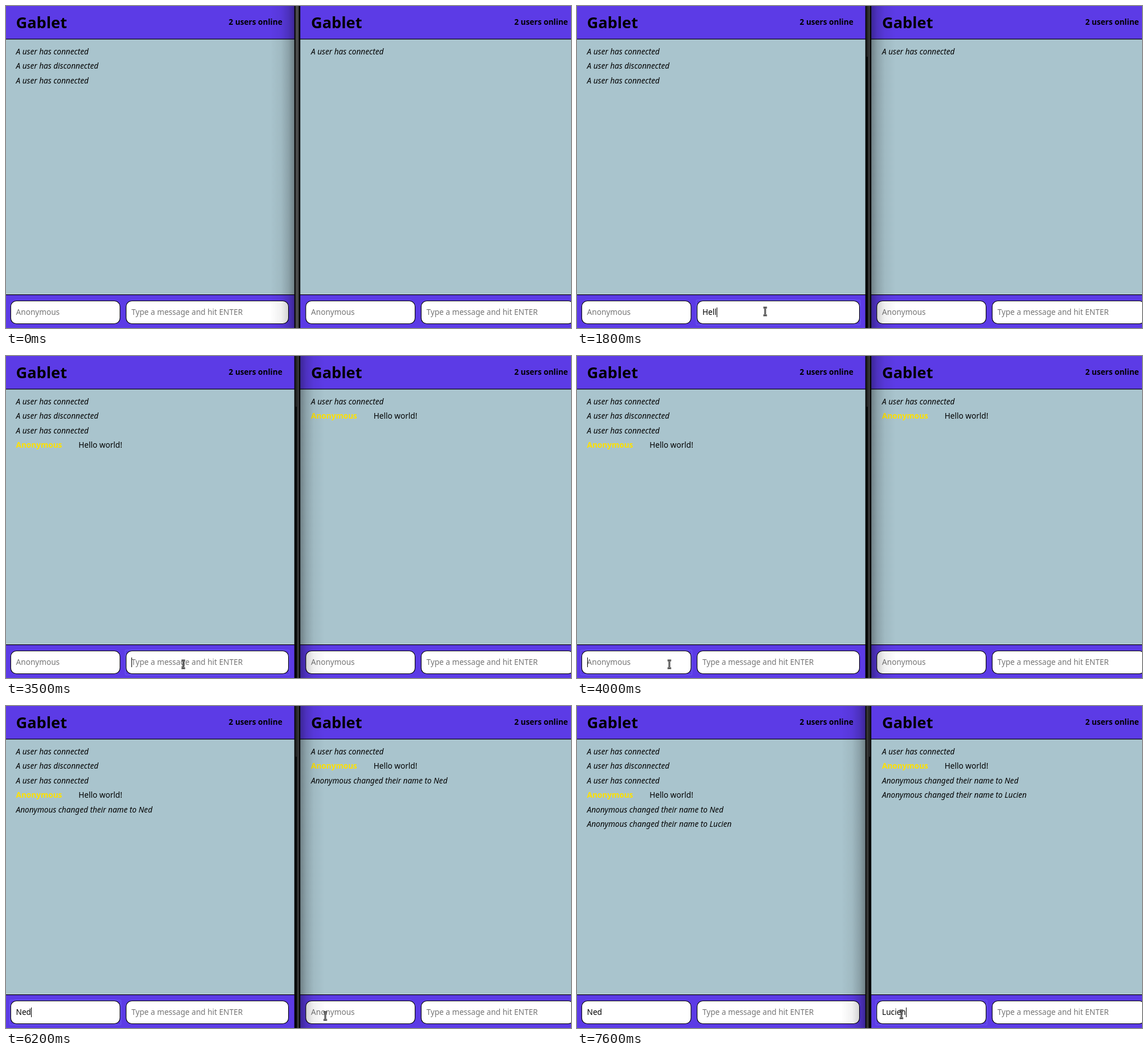
An HTML page that plays this animation: 991x565 px, repeating every 8000 ms.

```html
<!DOCTYPE html>
<html lang="en">
<head>
<meta charset="utf-8">
<title>Chat demo</title>
<style>
html, body { margin: 0; width: 100%; height: 100%; overflow: hidden; background: #a9c4cd; }
svg { display: block; width: 991px; height: 565px; }
text { font: 13.6px "Noto Sans", "Open Sans", sans-serif; white-space: pre; fill: #000; }
.title { font-size: 27.2px; font-weight: 700; }
.bold { font-weight: 700; }
.note { font-style: italic; }
.author { font-weight: 700; fill: #ffe100; }
.hint { fill: #757575; }
.box { fill: #fff; stroke: #000; stroke-width: 1.1; }
.ring { fill: none; stroke: #6a5cf2; stroke-width: 1; }
</style>
</head>
<body>
<svg id="stage" viewBox="0 0 991 565">
  <defs>
    <linearGradient id="shade">
      <stop offset="0" stop-opacity=".34"/>
      <stop offset=".25" stop-opacity=".17"/>
      <stop offset=".55" stop-opacity=".055"/>
      <stop offset="1" stop-opacity="0"/>
    </linearGradient>
  </defs>
</svg>
<script>
const LOOP = 8000, STEP = 100, ROW = 25.45;
const APP = "Gablet", FIRST = "Ned", SECOND = "Lucien", HELLO = "Hello world!";
const HINTS = ["Anonymous", "Type a message and hit ENTER"];
const stage = document.getElementById("stage");

function add(tag, attrs, parent = stage) {
  const el = document.createElementNS("http://www.w3.org/2000/svg", tag);
  for (const key in attrs) el.setAttribute(key, attrs[key]);
  parent.appendChild(el);
  return el;
}
function rect(x, y, width, height, fill, parent) {
  return add("rect", { x, y, width, height, fill }, parent);
}
function label(x, y, str, cls = "", parent = stage) {
  const el = add("text", { x, y, class: cls }, parent);
  el.textContent = str;
  return el;
}
function show(el, on) { el.style.display = on ? "" : "none"; }

function makeField(x, width, hint) {
  const ring = add("rect", { x: x - 1.5, y: 516, width: width + 3, height: 43.5, rx: 1, class: "ring" });
  add("rect", { x, y: 517.5, width, height: 40, rx: 10, class: "box" });
  const text = label(x + 9.3, 542.3, hint);
  const caret = rect(0, 529, 1, 17, "#000");
  return { x: x + 9.3, hint, ring, text, caret };
}

// Lines: [time, text, isMessage]
function makePane(x, width, countX, lines) {
  rect(x, 0, width, 565, "#a9c4cd");
  rect(x, 0, width, 58, "#5c3be6");
  rect(x, 57.5, width, 1.2, "#000");
  rect(x, 505, width, 1, "#c3d6dc");
  rect(x, 506, width, 59, "#5c3be6");
  rect(x, 506, width, 1.2, "#000");
  const left = x ? 517.5 : 0;
  label(left + 17.5, 38.8, APP, "title");
  label(countX, 33, "2 users online", "bold");
  const rows = lines.map(([time, str, isMessage], i) => {
    const g = add("g", {}), y = 84.7 + i * ROW;
    label(left + 17.5, y, isMessage ? HINTS[0] : str, isMessage ? "author" : "note", g);
    if (isMessage) label(left + 127.3, y, str, "", g);
    return { time, g };
  });
  const fields = [makeField(left + 8.3, 191.7, HINTS[0]),
                  makeField(left + 210.7, x ? 267.8 : 284.8, HINTS[1])];
  return { rows, fields };
}

const joined = "A user has connected";
const renamed = name => "Anonymous changed their name to " + name;
const shared = [[3100, HELLO, true], [5200, renamed(FIRST)], [7600, renamed(SECOND)]];
const panes = [
  makePane(0, 506, 390.6, [[0, joined], [0, "A user has disconnected"], [0, joined], ...shared]),
  makePane(516, 475, 891.5, [[0, joined], ...shared])
];
const rows = panes.flatMap(p => p.rows);
const fields = panes.flatMap(p => p.fields);

// Shadows cast by the focused window, and the frame between the windows.
const leftShade = add("rect", { x: -506, y: 0, width: 43, height: 565, fill: "url(#shade)", transform: "scale(-1 1)" });
const rightShade = rect(516, 0, 43, 565, "url(#shade)");
rect(505.7, 0, 10.5, 565, "#050505");
function makeFrame(x, width, color, tabX) {
  const g = add("g", {});
  rect(x, 0, width, 565, color, g);
  if (tabX) rect(tabX, 0, 2.5, 89, "#242424", g);
  return g;
}
const frames = [makeFrame(507.8, 5.6, "#4b4b4b"), makeFrame(510.3, 3.7, "#363636", 507.5), makeFrame(507.5, 4.2, "#363636", 512)];

const pointer = add("g", {});
const beam = "M-3.2 -6.8H-1.2L0 -5.8L1.2 -6.8H3.2M0 -5.8V5.8M-3.2 6.8H-1.2L0 5.8L1.2 6.8H3.2";
add("path", { d: beam, fill: "none", stroke: "#000", "stroke-width": 2.8 }, pointer);
add("path", { d: beam, fill: "none", stroke: "#fff", "stroke-width": .8 }, pointer);

// Typed text: [time, characters shown]
const typing = [
  { str: FIRST, keys: [[4500, 1], [4700, 2], [4800, 3]] },
  { str: HELLO, keys: [[1400, 1], [1600, 3], [1800, 4], [1900, 5], [2100, 6], [2300, 7], [2400, 8], [2800, 10], [2900, 12], [3100, 0]] },
  { str: SECOND, keys: [[6800, 1], [7000, 2], [7100, 3], [7200, 4], [7300, 5], [7500, 6]] },
  { str: "", keys: [] }
];
const path = [[300, 330, 536], [3500, 311, 541], [3600, 243, 552], [3700, 172, 555], [3900, 162, 541],
  [5700, 205, 538], [5800, 355, 533], [5900, 506, 538], [6100, 536, 543], [6200, 560, 544], [6300, 569, 541]];
const focus = [[0, -1], [300, 1], [4000, 0], [6500, 2]];
const caretOn = [[0, 0], [300, 1], [3600, 0], [4000, 1], [5500, 0], [6100, 1]];

function at(keys, t) {
  let found = null;
  for (const key of keys) if (key[0] <= t) found = key;
  return found;
}

function draw(time) {
  const t = Math.floor(time % LOOP / STEP) * STEP;
  rows.forEach(r => show(r.g, t >= r.time));

  const active = at(focus, t)[1], blink = at(caretOn, t)[1];
  fields.forEach((f, i) => {
    const key = at(typing[i].keys, t);
    const typed = key ? typing[i].str.slice(0, key[1]) : "";
    f.text.textContent = typed || f.hint;
    f.text.setAttribute("class", typed ? "" : "hint");
    show(f.ring, i === active);
    show(f.caret, i === active && blink);
    const end = typed ? f.text.getComputedTextLength() : 0;
    f.caret.setAttribute("x", Math.round(f.x + end));
  });

  const fade = Math.min(1, Math.max(0, (t - 200) / 600));
  const toRight = t < 6500 ? fade : 0;
  leftShade.setAttribute("opacity", 1 - toRight);
  rightShade.setAttribute("opacity", toRight);
  frames[0].setAttribute("opacity", 1 - fade);
  frames[1].setAttribute("opacity", toRight);
  show(frames[2], t >= 6500);

  const spot = at(path, t);
  show(pointer, spot);
  if (spot) pointer.setAttribute("transform", `translate(${spot[1]} ${spot[2]})`);
}

const start = performance.now();
function tick() {
  draw(performance.now() - start);
  requestAnimationFrame(tick);
}
draw(0);
requestAnimationFrame(tick);
</script>
</body>
</html>
```
